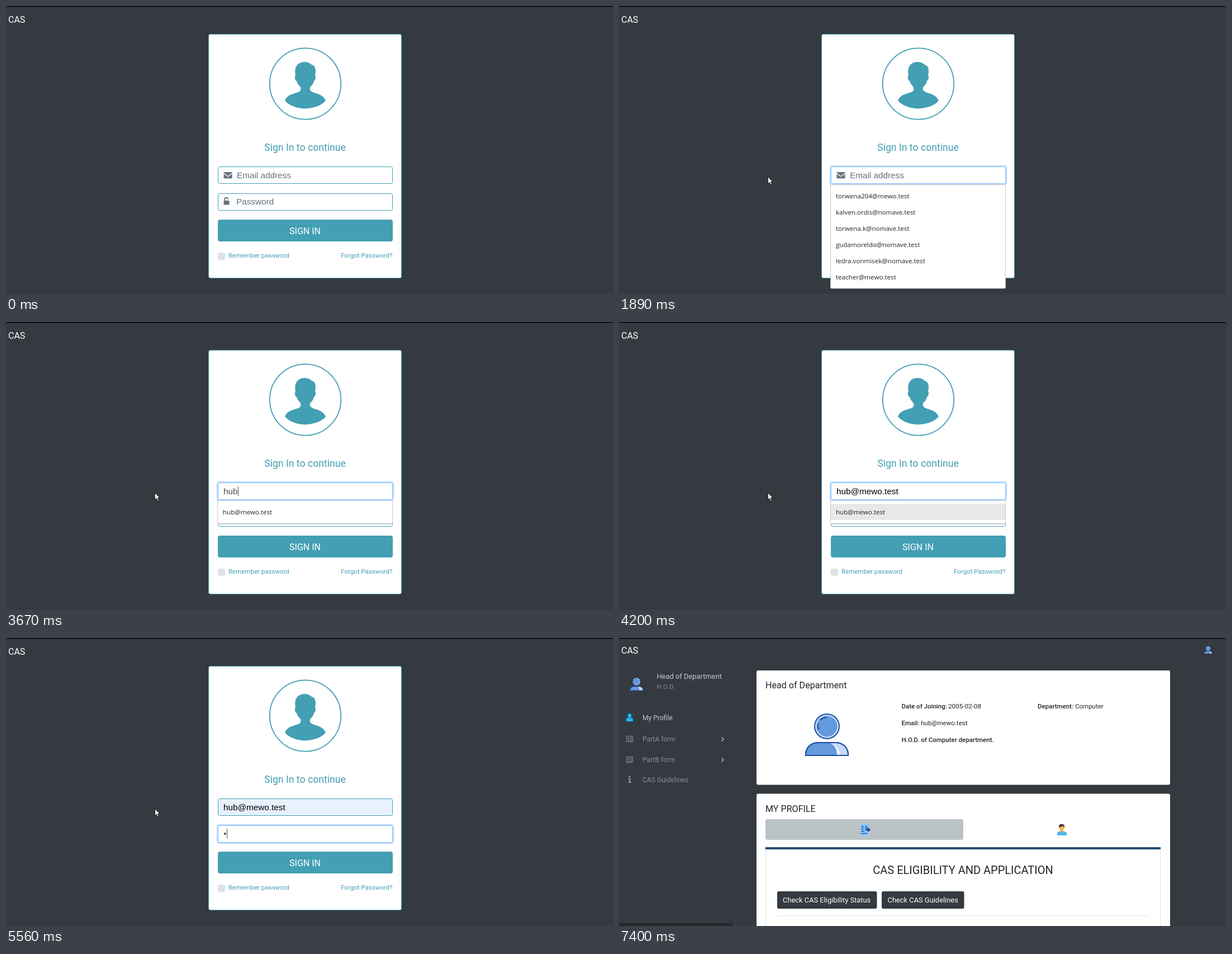
An HTML page that plays this animation: 1086 px wide and 515 px high, repeating every 8000 ms.

```html
<!DOCTYPE html>
<html lang="en">
<head>
<meta charset="utf-8">
<title>Sign in</title>
<style>
html, body { margin: 0; width: 100%; height: 100%; overflow: hidden; background: #343a40; }
svg { display: block; }
text { font-family: Roboto, sans-serif; white-space: pre; }
.teal { fill: #439fb3; }
.small { font-size: 11.5px; }
.input { font: 15.3px "Liberation Sans", Arial, sans-serif; }
.hint { fill: #66717b; }
.field { fill: #fff; stroke: #439fb3; }
.field.focus { stroke: #80bdff; }
.ring { fill: none; stroke: #007bff; stroke-opacity: .25; stroke-width: 2.6; }
.list text { font: 11.6px "Open Sans", "Noto Sans", sans-serif; fill: #222; }
.panel { fill: #fff; stroke: #c4c8cb; }
.white { fill: #fff; }
.light { fill: #c2c9d3; }
.gray { fill: #868e95; }
.ink { fill: #212529; }
.dark { fill: #343a40; }
.bold { font-weight: 500; }
.side { font-size: 12.1px; }
</style>
</head>
<body>
<svg width="1086" height="515" viewBox="0 0 1086 515">
  <defs>
    <g id="user" stroke="#1c4f9f" stroke-width="2">
      <path fill="#6499dc" d="M1 75V72C2 60 10 53 22 52H56C68 53 76 60 77 72V75Z"/>
      <path fill="#c3dafa" stroke="none" d="M45 53H56C68 54 75 61 76 74H62C62 63 56 55 45 53Z"/>
      <path fill="#eef5ff" stroke="none" d="M45 53C56 55 62 63 62 74H57C57 63 52 56 45 53Z"/>
      <path fill="none" d="M1 75V72C2 60 10 53 22 52H56C68 53 76 60 77 72V75Z"/>
      <circle cx="39" cy="23" r="22" fill="#c3dafa"/>
      <circle cx="39" cy="23" r="18.5" fill="#6499dc" stroke="none"/>
      <path fill="none" d="M24 29A16 16 0 0 1 24 18M27 12A16 16 0 0 1 39 7"/>
    </g>
    <g id="news">
      <path fill="none" stroke="#868e95" d="M.5.5H11.5V10.5H.5Z"/>
      <path stroke="#868e95" d="M2 3.5H6M2 5.5H6M2 8.5H10M7 2.5H10M7 4.5H10M7 6.5H10"/>
    </g>
    <path id="chevron" d="M0 0L3.5 3.5L0 7" fill="none" stroke="#a4abb1" stroke-width="1.7"/>
  </defs>

  <rect width="1086" height="515" class="dark"/>
  <rect width="1086" height="1.5" fill="#050607"/>

  <g data-on="0-7400">
    <text x="4" y="30" font-size="16" class="white">CAS</text>
    <rect x="362.5" y="50.5" width="345" height="436" rx="3" class="field"/>
    <circle cx="535.5" cy="139" r="63.7" fill="none" stroke="#439fb3" stroke-width="1.8"/>
    <path class="teal" d="M499 169C504 158 512 158 520 155C527 153 528 151 527 145C522 140 521 137 520 134C516 132 516 126 518 124C515 110 521 100 535 100C540 100 545 103 547 105C554 107 555 114 553 124C555 127 554 132 551 134C550 138 548 142 544 145C543 151 545 153 551 155C560 158 567 159 572 169C565 178 550 183 535 183.5C520 183 506 178 499 169Z"/>
    <text x="535" y="259" text-anchor="middle" font-size="17.65" class="teal">Sign In to continue</text>

    <rect id="ring1" class="ring" x="378" y="286" width="315" height="33" rx="4"/>
    <rect id="field1" class="field" x="379.5" y="287.5" width="312" height="30" rx="3"/>
    <g class="hint" data-on="0-3280">
      <path d="M389.5 297H404.5V298.6L397 304L389.5 298.6ZM389.5 300.3L397 305.6L404.5 300.3V308.3H389.5Z"/>
      <text class="input" x="413" y="308">Email address</text>
    </g>
    <text id="email" class="input" x="389" y="308"></text>

    <rect id="ring2" class="ring" x="378" y="334" width="315" height="33" rx="4"/>
    <rect id="field2" class="field" x="379.5" y="335.5" width="312" height="30" rx="3"/>
    <g class="hint" data-on="0-5560">
      <path d="M389.5 348H399.5V355.5H389.5Z"/>
      <path d="M391.2 349V346A3 3 0 0 1 397.2 345.5" fill="none" stroke="#66717b" stroke-width="1.8"/>
      <text class="input" x="412" y="355">Password</text>
    </g>
    <text id="pass" class="input" x="389" y="355" fill="#495057"></text>

    <rect x="379" y="382" width="313" height="39" rx="4" class="teal"/>
    <text x="535" y="407.5" text-anchor="middle" font-size="16" class="white">SIGN IN</text>
    <rect x="379" y="441" width="13" height="13" rx="3.5" fill="#dee2e6"/>
    <text x="398" y="450" class="teal small">Remember password</text>
    <text x="691.5" y="450" text-anchor="end" class="teal small">Forgot Password?</text>

    <g class="list" data-on="1090-3280">
      <path class="panel" d="M378.5 319.5H691.5V503Q691.5 505 689.5 505H380.5Q378.5 505 378.5 503Z"/>
      <g id="people"></g>
    </g>
    <g class="list" data-on="3280-4600">
      <path class="panel" d="M378.5 319.5H691.5V358.5Q691.5 360.5 689.5 360.5H380.5Q378.5 360.5 378.5 358.5Z"/>
      <path d="M380 361.5H690" stroke="#c9cdd0"/>
      <rect data-on="4200-4600" x="379" y="325" width="312" height="29" fill="#e8e8e9"/>
      <text x="388" y="344">hub@mewo.test</text>
    </g>
    <rect id="caret" width="1" height="17"/>
    <path id="arrow" d="M.5.5V12.8L3.3 10.2L5.2 14.7L7.3 13.8L5.4 9.4H9Z" fill="#fff" stroke="#15181b" stroke-width=".9"/>
    <path id="beam" d="M-3-7.5H-1L0-6.5L1-7.5H3M0-6.5V6.5M-3 7.5H-1L0 6.5L1 7.5H3" fill="none" stroke="#222"/>
  </g>

  <g data-on="7400-8000">
    <text x="4" y="27.5" font-size="16" class="white">CAS</text>
    <use href="#user" transform="translate(1047 14.5) scale(.18)"/>
    <use href="#user" transform="translate(19.5 71) scale(.305)"/>
    <text x="67.5" y="72.5" font-size="12.9" class="light">Head of Department</text>
    <text x="67.5" y="91" font-size="11.8" class="gray">H.O.D.</text>
    <rect x="10" y="132" width="18" height="20" rx="3" fill="#30404a"/>
    <path fill="#1fb5f5" d="M13 149V146Q13 142.5 17 142.5H21Q25 142.5 25 146V149Z"/>
    <circle cx="19" cy="138.7" r="3.4" fill="#1fb5f5"/>
    <text x="42" y="146.5" class="side light">My Profile</text>
    <use href="#news" x="13" y="175"/>
    <text x="42" y="184.5" class="side gray">PartA form</text>
    <use href="#chevron" x="183.5" y="177.5"/>
    <use href="#news" x="13" y="212"/>
    <text x="42" y="221.5" class="side gray">PartB form</text>
    <use href="#chevron" x="183.5" y="214.5"/>
    <path class="gray" d="M16.5 251H20.5V257H22V259H16.5V257H18V253H16.5Z"/>
    <circle cx="19" cy="248.3" r="1.7" class="gray"/>
    <text x="42" y="257.5" class="side gray">CAS Guidelines</text>

    <rect x="246" y="58" width="740" height="204.5" rx="3" class="white"/>
    <text x="262" y="90" font-size="16.1" class="ink">Head of Department</text>
    <use href="#user" transform="translate(333 135)"/>
    <g class="ink small">
      <text x="505.5" y="126" class="bold">Date of Joining:</text>
      <text x="589" y="126" font-size="11.7">2005-02-08</text>
      <text x="749" y="126" class="bold">Department:</text>
      <text x="816" y="126">Computer</text>
      <text x="505.5" y="155.5" class="bold">Email:</text>
      <text x="540" y="155.5">hub@mewo.test</text>
      <text x="505.5" y="185.5" class="bold">H.O.D. of Computer department.</text>
    </g>

    <rect x="246" y="278.5" width="740" height="240" rx="3" class="white"/>
    <text x="262" y="311" font-size="16.1" class="ink">MY PROFILE</text>
    <rect x="262" y="324" width="354" height="37" rx="4" fill="#bac2c6"/>
    <rect x="432" y="333" width="15" height="20" rx="1" fill="#8bc5f8"/>
    <circle cx="435.5" cy="337.5" r="1.7" fill="#1d5fae"/>
    <path d="M433 341.5H438M440 337.5H445M440 340.5H445M433 345.5H439M433 349.5H444" stroke="#1d5fae" stroke-width="1.4"/>
    <path d="M441 341.8H445V338.5L450 343L445 347.5V344.2H441Z" fill="#174a94"/>
    <path d="M784 353V350Q784 346 789 345.5H795Q801 346 801 350V353Z" fill="#4fb7ee"/>
    <path d="M789.5 343H794.5V346L792 348.5L789.5 346Z" fill="#f2a13a"/>
    <ellipse cx="792" cy="339.5" rx="4.4" ry="5.5" fill="#ffb74d"/>
    <path d="M787 339Q786 332.5 792 332.5Q798 332.5 797 339Q795 337.5 794.5 336Q791 338 787 339Z" fill="#4b3b35"/>
    <path d="M262.5 376V515M968.5 376V515" stroke="#dee2e6"/>
    <rect x="262" y="374" width="707" height="4" fill="#1f4a70"/>
    <text x="615.5" y="421.5" text-anchor="middle" font-size="20" class="ink">CAS ELIGIBILITY AND APPLICATION</text>
    <rect x="283" y="453" width="178.5" height="31" rx="3" class="dark"/>
    <rect x="470" y="453" width="147.5" height="31" rx="3" class="dark"/>
    <g font-size="12.88" class="white">
      <text x="293" y="472.5">Check CAS Eligibility Status</text>
      <text x="480.5" y="472.5">Check CAS Guidelines</text>
    </g>
    <path d="M283 496.5H948" stroke="#e2e4e6"/>
    <path d="M0 510H201Q204 510 204 513V515H0Z" fill="#24272c"/>
  </g>
</svg>
<script>
const LOOP = 8000;
const $ = id => document.getElementById(id);

$('people').innerHTML = [
  'torwena204@mewo.test', 'kalven.ordis@nomave.test', 'torwena.k@nomave.test',
  'gudamoreldo@nomave.test', 'ledra.vonmisek@nomave.test', 'teacher@mewo.test'
].map((s, i) => `<text x="388" y="${344 + 29 * i}">${s}</text>`).join('');

// Each track holds [start ms, value...] steps.
const email = [[0, ''], [3280, 'h'], [3420, 'hu'], [3670, 'hub'], [4200, 'hub@mewo.test']];
const pass = [[0, ''], [5560, '•'], [5810, '••'], [5950, '•••']];
const focus = [[0, 0], [1090, 1], [4860, 2]];
const blink = [[0, 0], [1090, 1], [1650, 0], [2160, 1], [2560, 0], [3120, 1], [4200, 0],
  [4600, 1], [5290, 0], [5560, 1], [6510, 0], [7100, 1]];
const pointer = [[0, ''], [520, 'arrow', 458, 237], [660, 'arrow', 463, 268],
  [790, 'beam', 468.5, 312], [940, 'beam', 478.5, 304], [1090, 'beam', 474.5, 304],
  [1390, 'arrow', 330, 300], [1510, 'arrow', 272, 301], [1650, 'arrow', 268, 304],
  [1890, 'arrow', 266, 305]];

const timed = [...document.querySelectorAll('[data-on]')]
  .map(el => [el, ...el.dataset.on.split('-').map(Number)]);
const step = (track, t) => track.findLast(s => s[0] <= t);
const value = (track, t) => step(track, t)[1];
const show = (el, on) => { el.style.display = on ? '' : 'none'; };
const write = (el, s) => { if (el.textContent !== s) el.textContent = s; };

function draw(t) {
  for (const [el, from, to] of timed) show(el, t >= from && t < to);
  write($('email'), value(email, t));
  write($('pass'), value(pass, t));
  $('email').style.fill = t < 4200 ? '#495057' : '#000';
  $('field1').style.fill = t < 4350 ? '#fff' : '#e8f0fe';

  const active = value(focus, t);
  for (const n of [1, 2]) {
    show($('ring' + n), active === n);
    $('field' + n).classList.toggle('focus', active === n);
  }
  $('ring1').style.opacity = t < 1240 ? .8 : 1;

  const caret = $('caret'), on = value(blink, t) && t < 7400;
  show(caret, on);
  if (on) {
    const text = $(active === 1 ? 'email' : 'pass');
    const width = text.textContent ? text.getComputedTextLength() : 0;
    caret.setAttribute('x', Math.round(389.6 + width));
    caret.setAttribute('y', active === 1 ? 294 : 341);
    caret.style.fill = t >= 4600 && active === 1 ? '#000' : '#495057';
  }

  const [, kind, x, y] = step(pointer, t);
  for (const id of ['arrow', 'beam']) {
    show($(id), kind === id);
    if (kind === id) $(id).setAttribute('transform', `translate(${x} ${y})`);
  }
}

const start = performance.now();
function tick() {
  draw((performance.now() - start) % LOOP);
  requestAnimationFrame(tick);
}
tick();
</script>
</body>
</html>
```
